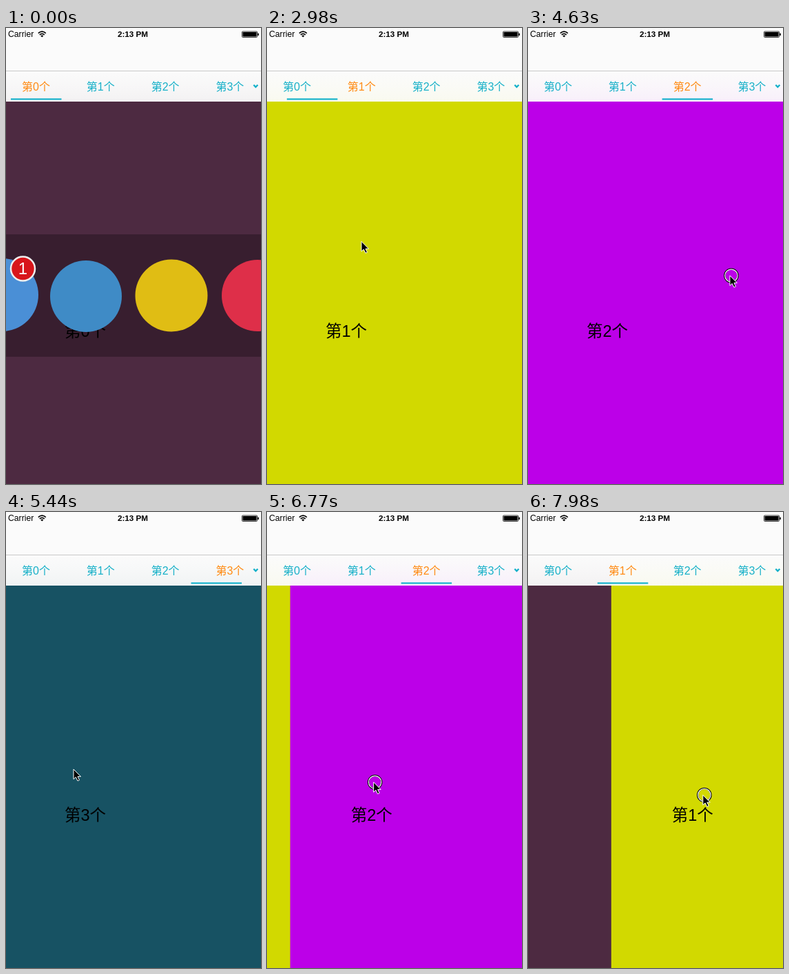
An HTML page for the animation above (8 s loop, 370 px wide and 663 px high).

```html
<!DOCTYPE html>
<html lang="zh">
<head>
<meta charset="utf-8">
<title>Paged tabs</title>
<style>
html, body { margin: 0; width: 100%; height: 100%; overflow: hidden; background: #fbfbfb; }
svg { display: block; width: 100%; height: 100%; }
text { font-family: "Liberation Sans", "Noto Sans CJK SC", "Noto Sans CJK", sans-serif; }
.cjk { font-weight: 300; }
</style>
</head>
<body>
<svg viewBox="0 0 370 663">
  <defs>
    <linearGradient id="veil" x1="0" y1="0" x2="0" y2="1">
      <stop offset="0" stop-color="#fbfbfb"/>
      <stop offset=".5" stop-color="#fbfbfb" stop-opacity=".98"/>
      <stop offset="1" stop-color="#fbfbfb" stop-opacity=".955"/>
    </linearGradient>
  </defs>
  <g id="pages"></g>

  <g id="switcher">
    <rect y="300" width="370" height="178" opacity=".28"/>
    <circle cx="-6" cy="388" r="53" fill="#4a8fd6"/>
    <circle cx="116" cy="390" r="52" fill="#3f8bc6"/>
    <circle cx="240" cy="389" r="52.5" fill="#e0bd14"/>
    <circle cx="365" cy="389" r="52" fill="#de2f49"/>
    <circle cx="24.5" cy="350" r="17.5" fill="#d8161b" stroke="#eee" stroke-width="2.5"/>
    <text x="24.5" y="358" font-size="24" fill="#fff" text-anchor="middle">1</text>
  </g>

  <rect width="370" height="63" fill="#fbfbfb"/>
  <rect y="62.5" width="370" height="44.5" fill="url(#veil)"/>
  <rect y="62" width="370" height="1" fill="#c9c9c9"/>

  <text x="3" y="13.2" font-size="12.2">Carrier</text>
  <g fill="none" stroke="#000" stroke-width="1.7">
    <path d="M46.8 7.6Q52.3 2.8 57.8 7.6M48.8 9.9Q52.3 6.8 55.8 9.9"/>
    <path d="M50.2 11.2Q52.3 9.6 54.4 11.2L52.3 13.4Z" fill="#000" stroke="none"/>
  </g>
  <text x="184" y="13.2" font-size="11.7" font-weight="700" text-anchor="middle">2:13 PM</text>
  <rect x="342.5" y="5" width="22" height="8.5" rx="1" fill="none" stroke="#000" stroke-width=".8"/>
  <rect x="343.5" y="6" width="20" height="6.5"/>
  <rect x="365.3" y="7.5" width="1.6" height="3.5" rx=".6"/>

  <g id="tabs"></g>
  <path d="M359.3 82.8l3 3 3-3" fill="none" stroke="#12b0c9" stroke-width="2.3"/>
  <rect id="line" y="102.4" width="73.5" height="2.1" fill="#0fb1cc"/>

  <g id="cursor">
    <g id="ring" fill="none">
      <circle cx="2" r="9.6" stroke="#000" stroke-width="2.4"/>
      <circle cx="2" r="9.2" stroke="#fff" stroke-width="1.2"/>
    </g>
    <path d="M0 0V14.5L3.3 11.5 6 17 8.5 15.8 6 10.7H10.5Z" stroke="#fff" stroke-width="1"/>
  </g>
</svg>
<script>
const LOOP = 8000, PITCH = 374, TAB = 93.8;
const DRAG = 157, LIFT = 12, SETTLE = 340;
const COLORS = ['#4d2a41', '#d2d900', '#bc00e8', '#175263'];
const $ = id => document.getElementById(id);

const clamp = u => Math.max(0, Math.min(1, u));
const part = (t, a, b) => clamp((t - a) / (b - a));
const mix = (a, b, u) => a + (b - a) * u;
const smooth = u => u * u * (3 - 2 * u);
const pull = u => u ** 1.34;
const coast = u => 1 - (1 - u) ** 3;

function add(parent, tag, attrs, text = '') {
  const el = document.createElementNS('http://www.w3.org/2000/svg', tag);
  for (const k in attrs) el.setAttribute(k, attrs[k]);
  el.textContent = text;
  return parent.appendChild(el);
}

const pages = COLORS.map((fill, i) => {
  const g = add($('pages'), 'g', {});
  add(g, 'rect', { y: 63, width: PITCH + .5, height: 600, fill });
  add(g, 'text', { x: 88, y: 449, 'font-size': 23.5, class: 'cjk' }, `第${i}个`);
  return g;
});
const tabs = COLORS.map((_, i) => add($('tabs'), 'text', {
  x: 43.5 + TAB * i, y: 91, 'font-size': 16, 'text-anchor': 'middle', class: 'cjk'
}, `第${i}个`));

// press time, release time, press point; a swipe from the right half goes forward
const swipes = [
  [2030, 2530, 253, 288],
  [3690, 3960, 287, 348],
  [4630, 4873, 293, 360],
  [5600, 5840, 97, 374],
  [6690, 6930, 118, 390],
  [7780, 8020, 130, 402]
].map(([press, release, x, y]) => ({ press, release, x, y, dir: x > 185 ? 1 : -1 }));

// cursor moves: start, end, x, y, easing
const moves = [
  [590, 1100, 195, 212, smooth],
  [1100, 1490, 240, 265, smooth],
  [1730, 1850, 265, 288, smooth],
  [1970, 2030, 253, 288, smooth]
];
swipes.forEach((s, i) => {
  moves.push([s.press, s.release, s.x - s.dir * DRAG, s.y + LIFT, pull]);
  const next = swipes[i + 1];
  if (next) moves.push([s.release + 200, next.press - 120, next.x, next.y, smooth]);
});

function show(t) {
  let pos = 0, current = 0, under = 0, down = false;
  for (const { press, release, dir } of swipes) {
    const settled = release + SETTLE;
    const drop = DRAG / PITCH;
    pos += dir * (drop * pull(part(t, press, release)) + (1 - drop) * coast(part(t, release, settled)));
    under += dir * smooth(part(t, settled + 17, settled + 317));
    if (t >= settled - 20) current += dir;
    down ||= t >= press && t < release;
  }
  pages.forEach((g, i) => g.setAttribute('transform', `translate(${-3 + (i - pos) * PITCH})`));
  tabs.forEach((el, i) => el.setAttribute('fill', i === current ? '#ff8a12' : '#16b0c8'));
  $('line').setAttribute('x', 7 + TAB * under);
  $('switcher').setAttribute('opacity', 1 - part(t, 45, 410));

  let x = 129, y = 413;
  for (const [a, b, toX, toY, ease] of moves) {
    const u = ease(part(t, a, b));
    x = mix(x, toX, u);
    y = mix(y, toY, u);
  }
  $('cursor').setAttribute('transform', `translate(${x} ${y})`);
  $('cursor').setAttribute('visibility', t < 590 ? 'hidden' : 'inherit');
  $('ring').setAttribute('display', down ? 'inline' : 'none');
}

const origin = performance.now();
function tick() {
  show((performance.now() - origin) % LOOP);
  requestAnimationFrame(tick);
}
show(0);
requestAnimationFrame(tick);
</script>
</body>
</html>
```
